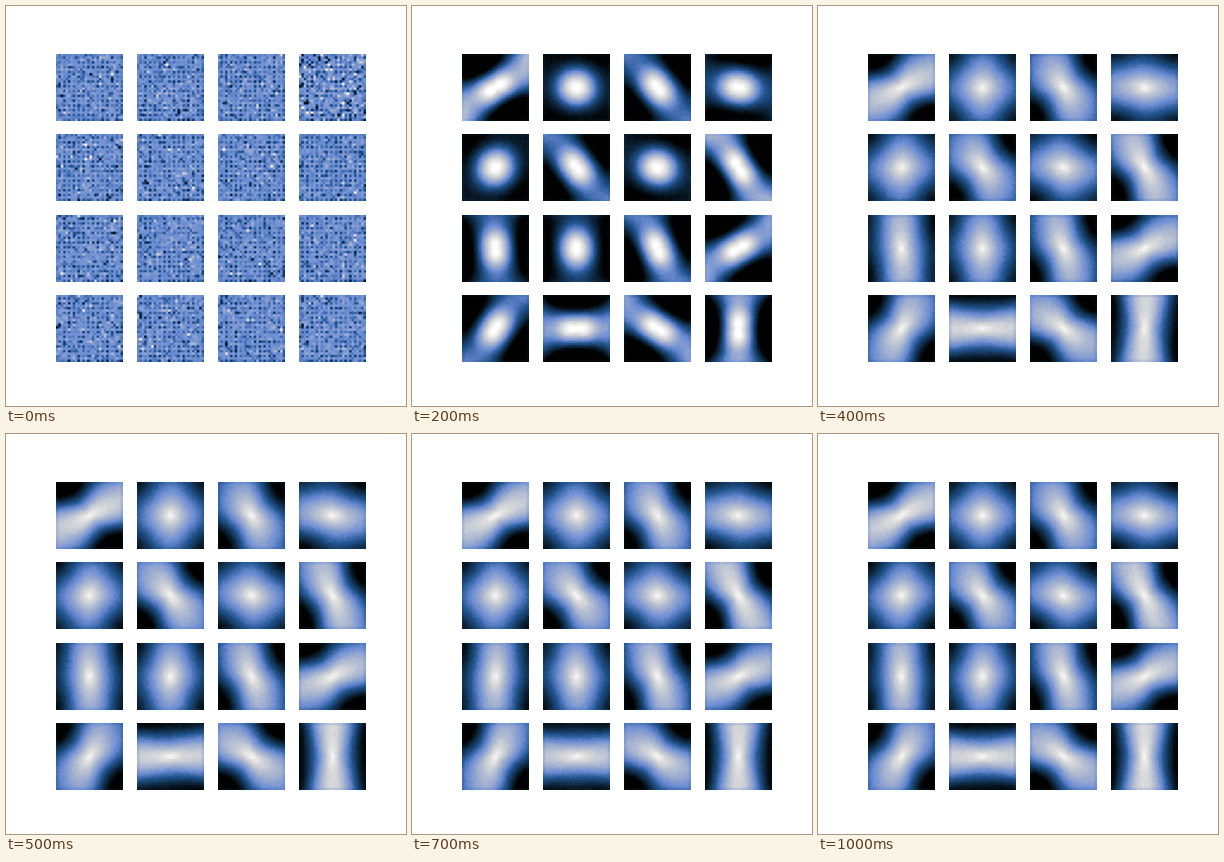
Animation of 400 by 400 pixels, one loop 1.1 s. Source, as a matplotlib script:

```python
import numpy as np
import matplotlib.pyplot as plt
from matplotlib.animation import FuncAnimation
from matplotlib.colors import LinearSegmentedColormap

FRAMES, CELLS = 11, 28

blues = LinearSegmentedColormap.from_list("blues", [
    "#000100", "#0f2a44", "#235591", "#6a8bd3",
    "#a5b3d0", "#d8d9da", "#ffffff"], N=40)

# stretch of each blob: real part along the axes, imaginary along the diagonals
LATENT = [
    .20 + .40j, 0, -.09 - .23j, .16 - .04j,
    -.02 + .04j, -.07 - .29j, .04 - .04j, -.19 - .33j,
    -.25, -.13, -.19 - .21j, .21 + .32j,
    -.10 + .28j, .38 + .03j, .11 - .33j, -.42 + .02j,
]

axis = (np.arange(CELLS) + .5) / CELLS * 2 - 1
X, Y = np.meshgrid(axis, -axis)
R, THETA = np.hypot(X, Y), np.arctan2(Y, X)
EDGE = np.maximum(abs(X), abs(Y)) > 1 - 1.5 / CELLS
odd = np.arange(CELLS) % 2
CHECKER = np.outer(odd, odd) == 1
SHARED = np.random.default_rng(3).normal(size=R.shape)


def static(rng):
    """Untrained texture: a light lattice with dark dots."""
    n = .55 * SHARED + .83 * rng.normal(size=R.shape)
    return np.where(CHECKER, .36 + .13 * n, .53 + .04 * n + .014 * n ** 3)


def blob(z, step):
    """Radial peak, pulled out along one direction."""
    settled = np.clip((step - 2) / 2, 0, 1)
    early = np.exp(-(R / .6) ** 2)
    late = 1 - .66 * R ** .75 + .06 * R ** 2 * np.cos(4 * THETA)
    pull = (.8 if step == 1 else 1.4 - .4 * settled) * R
    stretch = np.real(np.conj(z) * np.exp(2j * THETA))
    return early + (late - early) * settled + pull * stretch


def sample(step, k):
    rng = np.random.default_rng(100 * step + k)
    if step == 0:
        v = static(rng)
    else:
        z = LATENT[k] + .02 * complex(*rng.normal(size=2))
        v = blob(z, step) + .008 * rng.normal(size=R.shape)
    v = np.clip(v, 0, 1)
    return np.where(EDGE, .85 * v + .04, v)


fig, axes = plt.subplots(4, 4, figsize=(4, 4), dpi=100)
fig.subplots_adjust(left=.125, right=.9, bottom=.11, top=.88,
                    wspace=.2, hspace=.2)
images = []
for k, ax in enumerate(axes.flat):
    ax.axis("off")
    images.append(ax.imshow(sample(0, k), cmap=blues, vmin=0, vmax=1))


def update(step):
    for k, image in enumerate(images):
        image.set_data(sample(step, k))
    return images


anim = FuncAnimation(fig, update, frames=FRAMES, interval=100, repeat=True)
plt.show()
```
